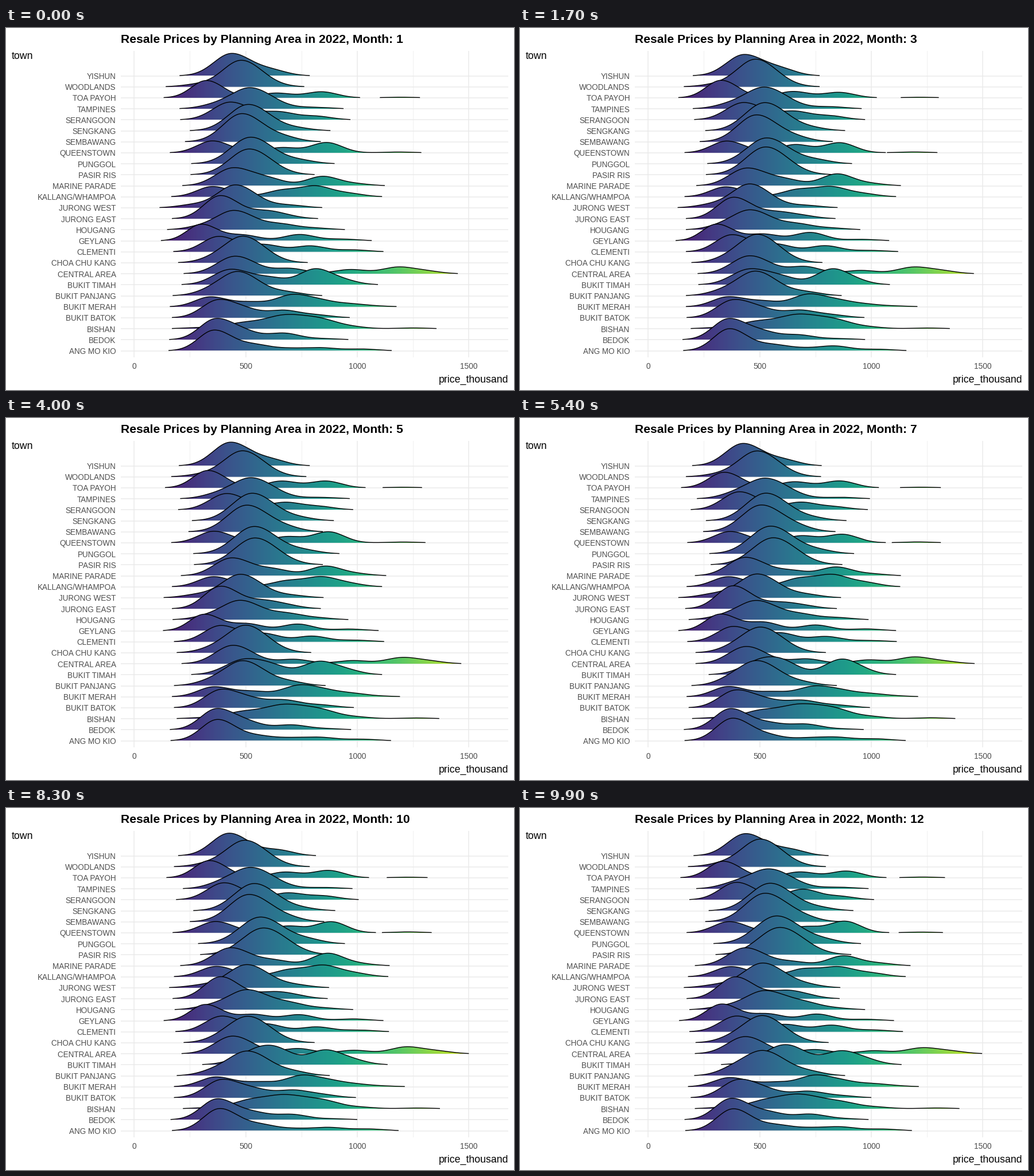
Animation of 885 by 632 pixels, one loop 10 s. Source, as a matplotlib script:

```python
import numpy as np
import matplotlib.pyplot as plt
from matplotlib.animation import FuncAnimation
from matplotlib.path import Path

W, H, DPI = 885, 632, 64
PT = 72 / DPI                       # points per pixel
FRAMES, INTERVAL, MONTHS = 100, 100, 12
LEFT, RIGHT, TOP, BOTTOM = 200, 875, 40, 575
ROW0, ROW_STEP = 83.5, 19.2
CUT = 0.5                           # ridges lower than this are not drawn
BANDWIDTH = 27                      # spread of the secondary bumps
TAIL_DRIFT = 14                     # how far those bumps move up in a year
X = np.linspace(231, 844, 512)

plt.rcParams["font.family"] = "Liberation Sans"
rng = np.random.default_rng(2022)
towns = []


def bell(x, height, left, right=None):
    sd = np.where(X < x, left, right or left)
    return height * np.exp(-0.5 * ((X - x) / sd) ** 2)


def town(name, jan, dec, height, *bumps):
    """A main hump moving from jan to dec, plus (x, height) bumps beside it."""
    curves = []
    for u in np.linspace(0, 1, MONTHS):
        x = jan + (dec - jan) * u + rng.normal(0, 1.5)
        left = 27 + 0.11 * (x - 360)
        curve = bell(x, height * (1 + rng.normal(0, 0.03)), left, left + 4)
        for bx, bh in bumps:
            bx += TAIL_DRIFT * (u - 0.5) + rng.normal(0, 3)
            curve += bell(bx, bh * np.exp(rng.normal(0, 0.12)), BANDWIDTH)
        curves.append(curve)
    towns.append((name, np.array(curves)))


town("YISHUN", 389, 390, 40, (465, 10))
town("WOODLANDS", 408, 419, 46, (345, 4))
town("TOA PAYOH", 349, 357, 30, (480, 10), (560, 11), (695, 1.2))
town("TAMPINES", 425, 432, 37, (365, 6), (550, 2.5))
town("SERANGOON", 390, 378, 30, (485, 14), (545, 6))
town("SENGKANG", 424, 436, 48, (515, 4))
town("SEMBAWANG", 410, 428, 47, (490, 5))
town("QUEENSTOWN", 361, 366, 20, (488, 12), (562, 19), (692, 1.5))
town("PUNGGOL", 425, 447, 47, (525, 5))
town("PASIR RIS", 425, 452, 47)
town("MARINE PARADE", 395, 392, 31, (470, 9), (555, 17), (612, 4))
town("KALLANG/WHAMPOA", 358, 368, 18, (490, 12), (547, 17), (602, 6))
town("JURONG WEST", 400, 422, 40, (335, 5), (500, 4))
town("JURONG EAST", 372, 375, 39, (455, 11), (495, 5))
town("HOUGANG", 398, 425, 33, (350, 5), (490, 9), (545, 3))
town("GEYLANG", 340, 352, 29, (425, 12), (512, 12), (600, 3))
town("CLEMENTI", 370, 378, 27, (455, 13), (535, 11), (612, 3))
town("CHOA CHU KANG", 415, 424, 46, (365, 5))
town("CENTRAL AREA", 398, 395, 31, (502, 9), (605, 6), (690, 11), (738, 5))
town("BUKIT TIMAH", 390, 455, 27, (465, 10), (548, 24), (592, 8))
town("BUKIT PANJANG", 408, 422, 43, (360, 6), (500, 6))
town("BUKIT MERAH", 358, 366, 17, (435, 8), (505, 17), (550, 11), (605, 5), (655, 1))
town("BUKIT BATOK", 369, 380, 31, (430, 10), (492, 13), (550, 5))
town("BISHAN", 488, 484, 25, (345, 2), (410, 9), (555, 9), (610, 3), (715, 1.6))
town("BEDOK", 364, 370, 37, (430, 10), (495, 9), (560, 2))
town("ANG MO KIO", 364, 374, 38, (440, 9), (500, 4), (555, 6), (625, 3))


fig = plt.figure(figsize=(W / DPI, H / DPI), dpi=DPI, facecolor="white")
ax = fig.add_axes([LEFT / W, 1 - BOTTOM / H, (RIGHT - LEFT) / W, (BOTTOM - TOP) / H])
ax.axis("off")


def label(x, y, s, px, ha="left", color="black", weight="normal"):
    return ax.text(x, y, s, size=px * PT, ha=ha, va="baseline",
                   color=color, weight=weight)


def price_x(p):
    return 223.2 + p * 0.38867


for p in range(0, 1501, 250):
    major = p % 500 == 0
    ax.axvline(price_x(p), color="#ebebeb", lw=(1.5 if major else 0.75) * PT, zorder=0)
    if major:
        label(price_x(p), 595, str(p), 13.7, "center", "#4d4d4d")

title = label(199.7, 26, "", 21.1, weight="bold")
label(9.5, 54.5, "town", 17.7)
label(875, 618.5, "price_thousand", 17.8, "right")

gradient = plt.cm.viridis(np.linspace(0, 1, 613))[None]
ridges = []
for n, (name, heights) in enumerate(towns):
    base = ROW0 + n * ROW_STEP
    ax.axhline(base, color="#ebebeb", lw=1.5 * PT, zorder=0)
    label(191.5, base + 5.5, name, 13.5, "right", "#4d4d4d")
    fill = ax.imshow(gradient, extent=(X[0], X[-1], base, base - 62), aspect="auto",
                     interpolation="nearest", zorder=2 + n)
    line, = ax.plot([], [], color="black", lw=1.4 * PT, zorder=2.5 + n)
    ridges.append((base, heights, fill, line))

ax.set_xlim(LEFT, RIGHT)
ax.set_ylim(BOTTOM, TOP)


def update(frame):
    month = (MONTHS - 1) * frame / (FRAMES - 1)
    title.set_text(f"Resale Prices by Planning Area in 2022, Month: {round(month) + 1}")
    k = min(int(month), MONTHS - 2)
    t = month - k
    for base, heights, fill, line in ridges:
        h = (1 - t) * heights[k] + t * heights[k + 1]
        shown = h >= CUT
        line.set_data(X, np.where(shown, base - h, np.nan))
        top = base - np.where(shown, h, 0)
        outline = np.column_stack([[X[0], *X, X[-1]], [base, *top, base]])
        fill.set_clip_path(Path(outline), ax.transData)
    return []


anim = FuncAnimation(fig, update, frames=FRAMES, interval=INTERVAL,
                     repeat=True, repeat_delay=0, blit=False)
plt.show()
```
